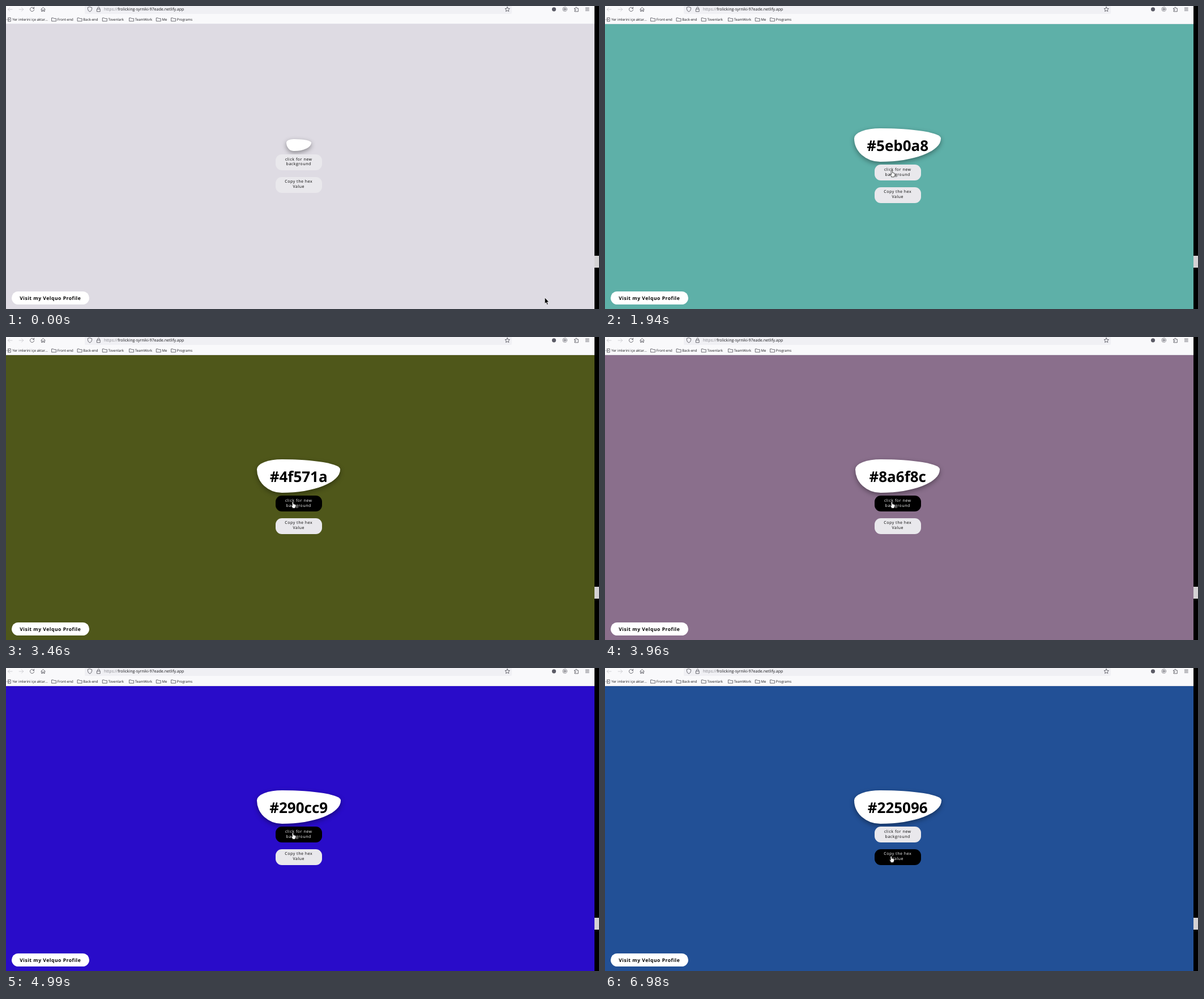
These frames come from a looping animation (1047x535 px, 7990 ms). An HTML page:

```html
<!DOCTYPE html>
<html lang="tr">
<head>
<meta charset="utf-8">
<title>Hex background picker</title>
<style>
  html, body { margin: 0; width: 100%; height: 100%; overflow: hidden; }
  body { position: relative; background: #000; font-family: "Open Sans", "Noto Sans", sans-serif; text-rendering: geometricPrecision; }
  body > * { position: absolute; box-sizing: border-box; text-align: center; white-space: pre; }
  svg { left: 0; top: 0; width: 1047px; height: 535px; }
  #page { left: 0; top: 32px; width: 1039px; height: 503px; }
  #thumb { left: 1039px; top: 441px; width: 8px; height: 21px; background: #d4d2d4; }
  #blob { background: #fff; border-radius: 30% 70% 70% 30% / 30% 30% 70% 70%; box-shadow: 0 3px 9px rgba(0, 0, 0, .38);
    font-size: 26px; font-weight: 700; line-height: 61px; display: flex; justify-content: center; }
  .btn { left: 476px; width: 81.5px; height: 28px; padding-top: 5.5px; border-radius: 11px;
    font-size: 7px; font-weight: 500; line-height: 8.8px; letter-spacing: .55px; }
  #visit { left: 10px; top: 504px; width: 136.5px; height: 22.5px; border-radius: 12px; background: #fff;
    font-size: 8.6px; font-weight: 700; line-height: 24px; letter-spacing: .5px; }
</style>
</head>
<body>
<div id="page"></div>
<div id="thumb"></div>
<div id="blob"></div>
<div class="btn">click for new
background</div>
<div class="btn">Copy the hex
Value</div>
<div id="visit">Visit my Velquo Profile</div>

<svg viewBox="0 0 1047 535" fill="none" stroke="#4a4a52" stroke-width=".8" stroke-linecap="round" stroke-linejoin="round">
  <path fill="#f9f9fb" stroke="none" d="M0 0H1039V32H0Z"/>
  <path stroke="#e4e4ea" stroke-width="1" stroke-linecap="butt" d="M0 31.5H1039"/>
  <path fill="#f0f0f4" stroke="none" d="M139 0H893V12Q893 14 891 14H141Q139 14 139 12Z"/>
  <!-- navigation -->
  <path stroke="#c4c4ca" d="M11 6H3.5M6.7 2.8L3.5 6L6.7 9.2M23.2 6H30.7M27.5 2.8L30.7 6L27.5 9.2"/>
  <path d="M49.2 4A3.6 3.6 0 1 0 49.7 6.5M49.6 2V4.4H47.2"/>
  <path d="M61.8 6L65.5 2.3L69.2 6M62.8 5.2V9.6H64.4V7H66.6V9.6H68.2V5.2"/>
  <path d="M148 1.7L151.6 2.8V5.5Q151.3 8.6 148 10.2Q144.7 8.6 144.4 5.5V2.8Z"/>
  <path d="M160.8 5.3H166.2V9.8H160.8ZM161.8 5.2V3.6Q161.9 1.9 163.5 1.9Q165.1 1.9 165.2 3.6V5.2"/>
  <path id="star"/>
  <circle cx="967.5" cy="5.8" r="3.6" fill="#5b5b66" stroke="none"/>
  <circle cx="986.7" cy="5.6" r="3.8" stroke="#77777e"/>
  <circle cx="986.7" cy="5.6" r="1.9" fill="#aaaab0" stroke="#77777e"/>
  <path d="M1004 4H1005.8V2.8Q1006.8 1 1007.8 2.8V4H1010.3V9.8H1004V7.8Q1006.4 7.8 1006.4 6.8Q1006.4 5.8 1004 5.8Z"/>
  <path d="M1023.3 3.3H1029.3M1023.3 5.7H1029.3M1023.3 8.1H1029.3"/>
  <path d="M3.6 22V20.8H8.3V27.2H3.6V26M1.6 24H6M4.4 22.4L6 24L4.4 25.6"/>
  <g id="folders"></g>
  <g id="labels" fill="#18181c" stroke="none" font-size="6.1" font-weight="500">
    <text x="173" y="8.4" font-size="7.1"><tspan fill="#85858c">https://</tspan>frolicking-syrniki-97eade.netlify.app</text>
    <text x="11.3" y="26.2">Yer imlerini içe aktar...</text>
  </g>
  <path id="arrow" fill="#000" stroke="#fff" stroke-width=".6" d="M0 0V10.6L2.4 8.4L4.1 12.4L5.8 11.6L4.1 7.8H7.2Z"/>
  <path id="hand" fill="#fff" stroke="#000" stroke-width=".7"
    d="M-1.2 .9Q0 -.6 1.1 .9V4.3Q2 3.6 2.7 4.6Q3.8 4 4.2 5.1Q5.2 4.7 5.4 5.9V8Q5 9.6 4.2 10.2V11.5H-.9V10.2L-3.2 6.8Q-3 5.5 -1.2 7Z"/>
</svg>

<script>
const $ = id => document.getElementById(id);
const buttons = document.querySelectorAll(".btn");
const LOOP = 7990;

const folders = [["Front-end", 81], ["Back-end", 126.5], ["Tovenlark", 170.7], ["TeamWork", 218], ["Me", 265.7], ["Programs", 292]];
for (const [name, x] of folders) {
  $("folders").innerHTML += `<path d="M${x} 21h2.6l1 1.2h4v4.6h-7.6z"/>`;
  $("labels").innerHTML += `<text x="${x + 9.8}" y="26.2">${name}</text>`;
}

const starPoints = Array.from({ length: 10 }, (_, i) => {
  const a = i * Math.PI / 5, r = i % 2 ? 2.1 : 4.4;
  return `${885.2 + r * Math.sin(a)} ${6 - r * Math.cos(a)}`;
});
$("star").setAttribute("d", `M${starPoints.join("L")}Z`);

// start, background, label, blob width, hovered button, cursor, x, y
const steps = [
  [0, "#dedbe3", "", 44, -1, "arrow", 951.3, 515],
  [500, "#dedbe3", "", 44, -1, "arrow", 408.3, 189.3],
  [960, "#dedbe3", "", 44, 0, "hand", 506.5, 278.6],
  [1430, "#5eb0a8", "#5eb0a8", 152.5, 0, "hand", 506.5, 278.6],
  [1940, "#5eb0a8", "#5eb0a8", 152.5, -1, "hand", 506.5, 290.4],
  [2440, "#8b7d60", "#5eb0a8", 152.5, 0, "hand", 506.5, 290.8],
  [2950, "#8b7d60", "#8b7d60", 156.5, 0, "hand", 506.5, 290.8],
  [3460, "#4f571a", "#4f571a", 147, 0, "hand", 506.5, 290.8],
  [3960, "#8a6f8c", "#8a6f8c", 149, 0, "hand", 506.5, 290.8],
  [4460, "#e05afe", "#e05afe", 146, 0, "hand", 506.5, 290.8],
  [4990, "#290cc9", "#290cc9", 148, 0, "hand", 506.5, 290.8],
  [5480, "#6b7a92", "#6b7a92", 153, 0, "hand", 506.5, 290.8],
  [5980, "#a2a29a", "#a2a29a", 150.5, 0, "hand", 506.5, 290.8],
  [6490, "#225096", "#225096", 154, 0, "hand", 506.5, 290.8],
  [6980, "#225096", "#225096", 154, 1, "hand", 505.3, 332]
];

function show([, color, label, width, hover, cursor, x, y]) {
  const height = label ? 58.3 : 21.8;
  $("page").style.background = color;
  $("blob").textContent = label;
  Object.assign($("blob").style, {
    left: 516.7 - width / 2 + "px", top: 245.4 - height / 2 + "px",
    width: width + "px", height: height + "px"
  });
  buttons.forEach((button, i) => Object.assign(button.style, {
    top: 251.2 + height / 2 + i * 39.4 + "px",
    background: i === hover ? "#000" : "#e9e8ec",
    color: i === hover ? "#fff" : "#000"
  }));
  for (const id of ["arrow", "hand"]) {
    $(id).style.display = id === cursor ? "" : "none";
    $(id).setAttribute("transform", `translate(${x} ${y})`);
  }
}

let current;
function tick() {
  const t = performance.now() % LOOP;
  const step = steps.findLast(s => s[0] <= t);
  if (step !== current) show(current = step);
  requestAnimationFrame(tick);
}
tick();
</script>
</body>
</html>
```
